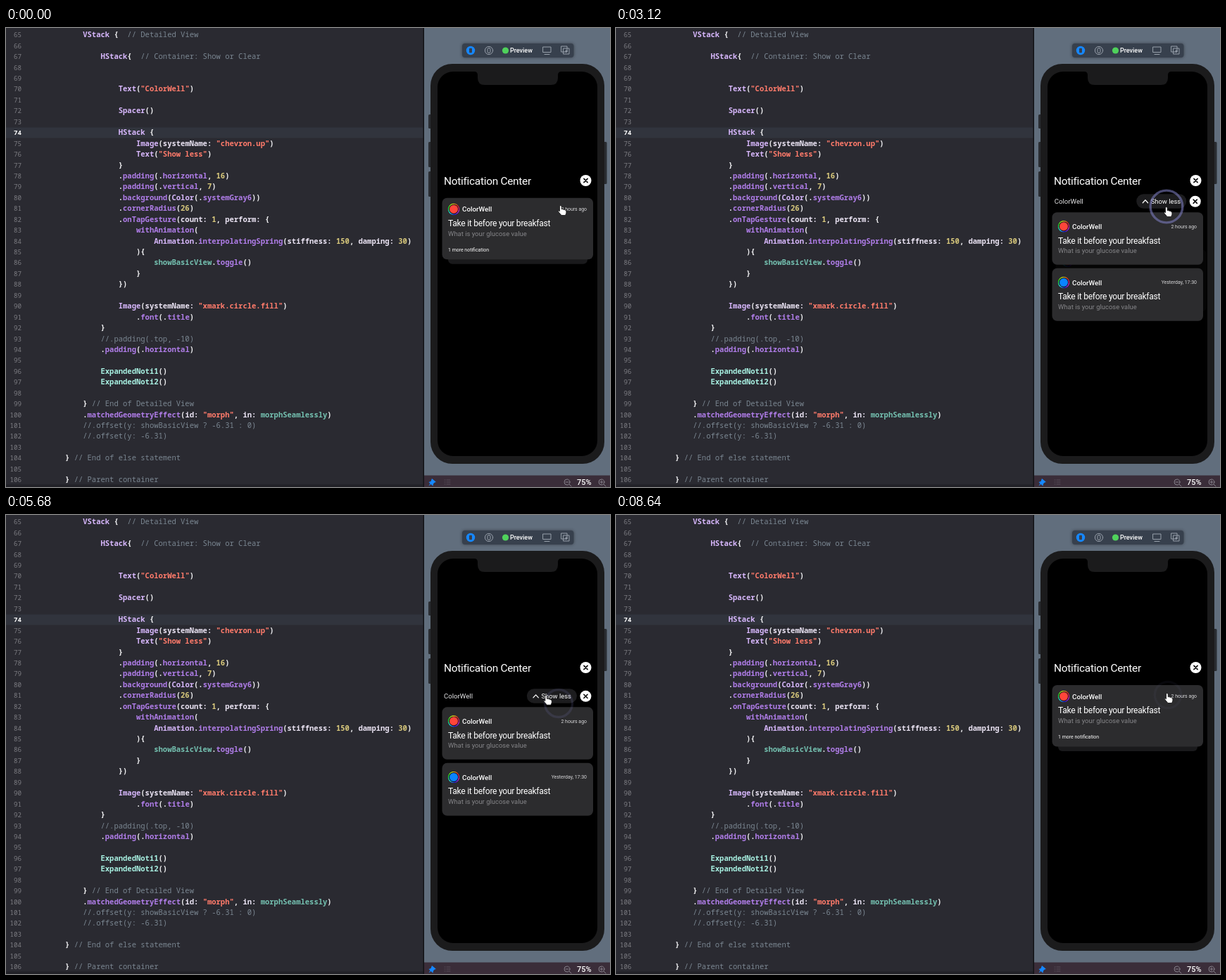
Animation of 858 by 653 pixels, one loop 8.72 s. Source, as an HTML page:

```html
<!DOCTYPE html>
<html lang="en">
<head>
<meta charset="utf-8">
<title>Notification morph</title>
<style>
  html, body { margin: 0; width: 100%; height: 100%; overflow: hidden; background: #2a2a31; }
  pre, svg { position: absolute; margin: 0; }
  svg { left: 0; top: 0; width: 858px; height: 653px; font-family: Roboto, Inter, sans-serif; fill: #fff; }
  pre { top: 2.3px; font: 600 10.52px/15.44px "Noto Sans Mono", "Liberation Mono", monospace; color: #f2f2f4; }
  #code { left: 84px; }
  #nums { left: 0; width: 22px; text-align: right; font-size: 9.2px; font-weight: 400; color: #7c7c82; }
  #nums b { color: #fff; }
  .comment { color: #7a8691; font-weight: 500; }
  .string { color: #ff7b6b; }
  .number { color: #d9c97c; }
  .type { color: #d8b8fd; }
  .label { color: #ebe4f4; }
  .own { color: #a8f1e2; }
  .state { color: #74c0b0; }
  .call { color: #b07de9; }
  .head { font-size: 12.1px; letter-spacing: -.28px; }
  .name { font-size: 9.8px; font-weight: 500; }
  .sub { font-size: 9.45px; fill: #858588; }
  .tiny { font-size: 6.95px; }
  .line { fill: none; stroke-linecap: round; stroke-linejoin: round; }
  #bar { filter: drop-shadow(0 0 2px #0006); }
</style>
</head>
<body>
<svg id="stage" viewBox="0 0 858 653"></svg>
<pre id="nums"></pre>
<pre id="code">
    VStack {  // Detailed View

        HStack{  // Container: Show or Clear


            Text("ColorWell")

            Spacer()

            HStack {
                Image(systemName: "chevron.up")
                Text("Show less")
            }
            .padding(.horizontal, 16)
            .padding(.vertical, 7)
            .background(Color(.systemGray6))
            .cornerRadius(26)
            .onTapGesture(count: 1, perform: {
                withAnimation(
                    Animation.interpolatingSpring(stiffness: 150, damping: 30)
                ){
                    showBasicView.toggle()
                }
            })

            Image(systemName: "xmark.circle.fill")
                .font(.title)
        }
        //.padding(.top, -10)
        .padding(.horizontal)

        ExpandedNoti1()
        ExpandedNoti2()

    } // End of Detailed View
    .matchedGeometryEffect(id: "morph", in: morphSeamlessly)
    //.offset(y: showBasicView ? -6.31 : 0)
    //.offset(y: -6.31)

} // End of else statement

} // Parent container</pre>
<script>
const $ = id => document.getElementById(id);

// Syntax colours
function kind(word) {
  if (word.startsWith('//')) return 'comment';
  if (word[0] === '"') return 'string';
  if (/^\d/.test(word)) return 'number';
  if (word.endsWith(':')) return 'label';
  if (/^Expanded/.test(word)) return 'own';
  if (/^(showBasicView|morphSeamlessly)$/.test(word)) return 'state';
  return /^[A-Z]/.test(word) ? 'type' : 'call';
}
$('code').innerHTML = $('code').textContent.replace(/\/\/.*|"[^"]*"|\w+:?/g,
  word => `<span class="${kind(word)}">${word}</span>`);
$('nums').innerHTML = Array.from({ length: 42 }, (_, i) => i + 65)
  .map(n => n === 74 ? `<b>${n}</b>` : n).join('\n');

// Drawing helpers
const box = (x, y, w, h, r, fill, more = '') =>
  `<rect x="${x}" y="${y}" width="${w}" height="${h}" rx="${r}" fill="${fill}" ${more}/>`;
const dot = (x, y, r, fill) => `<circle cx="${x}" cy="${y}" r="${r}" fill="${fill}"/>`;
const text = (x, y, s, cls, more = '') => `<text x="${x}" y="${y}" class="${cls}" ${more}>${s}</text>`;
const line = (d, stroke, width = 1) =>
  `<path class="line" d="${d}" stroke="${stroke}" stroke-width="${width}"/>`;

const closeButton = (x, y) => dot(x, y, 8, '#fff') +
  line(`M${x - 2.6} ${y - 2.6}l5.2 5.2m0 -5.2l-5.2 5.2`, '#000', 1.5);

function well(x, y, fill) {
  const at = a => `${x + 7.5 * Math.cos(a)} ${y + 7.5 * Math.sin(a)}`;
  let ring = '';
  for (let i = 0; i < 24; i++) {
    const a = i * Math.PI / 12;
    ring += line(`M${at(a)}A7.5 7.5 0 0 1 ${at(a + .27)}`, `hsl(${315 - i * 15} 75% 50%)`, 1.1);
  }
  return dot(x, y, 7.5, '#151517') + ring + dot(x, y, 6, fill);
}

// mid is the height of the card's title row
function card(y, height, mid, color, when) {
  return box(619.5, y, 214.5, height, 7, '#2c2c2e') +
    well(636, mid, color) +
    text(648, mid + 3.6, 'ColorWell', 'name') +
    text(825, mid + 2.3, when, 'tiny', 'text-anchor="end" fill="#d8d8da"') +
    text(628, mid + 24.4, 'Take it before your breakfast', 'head') +
    text(628, mid + 37.7, 'What is your glucose value', 'sub');
}

const lens = (x, plus) =>
  line(`M${x + 3} 649l3 3M${x - 2} 646h4${plus ? `M${x} 644v4` : ''}`, '#85808a') +
  `<circle class="line" cx="${x}" cy="646" r="4" stroke="#85808a"/>`;

$('stage').innerHTML =
  box(0, 141.5, 593, 15, 0, '#31343d') +
  box(0, 649.5, 593, 4, 0, '#212127') +
  box(594, 0, 264, 653, 0, '#616e7d') +
  box(592.5, 0, 1.5, 653, 0, '#121216') +
  box(594, 636.5, 264, 17, 0, '#3a2d39') +
  // Preview toolbar
  box(648, 22, 158.5, 20, 4, '#37404d', 'id="bar"') +
  dot(660, 32, 6.2, '#1687ff') + box(658, 28.8, 4, 6.4, 1, '#37404d') +
  '<g class="line" stroke="#98a0ab"><circle cx="686" cy="32" r="5.6"/><rect x="684" y="28.5" width="4" height="7" rx="2"/>' +
  '<path d="M763 27h11v7.5h-11zM765 37.5h7M789 26h8v8h-8zM792 29h8v8h-8zM794.5 33h3M796 31.5v3"/></g>' +
  dot(709.5, 32, 4.6, '#4fd15b') +
  text(716, 35.4, 'Preview', '', 'font-size="9" font-weight="500"') +
  // Zoom bar
  '<path d="M605 641l6 5l-2 .5l-2 2l-.5 3l-3 -2.5l-3 2.5l2 -3.5l-2 -2l3 -1z" fill="#1687ff"/>' +
  line('M623 643h1m2 0h5M623 646h1m2 0h5M623 649h1m2 0h5', '#554a57') +
  lens(797, false) + lens(846, true) +
  text(811, 650.3, '75%', '', 'font-size="11" font-weight="500"') +
  // Phone
  [[600, 123, 20], [600, 162, 36], [600, 204, 36], [848, 162, 60]]
    .map(([x, y, h]) => box(x, y, 5.5, h, 1.5, '#292c31')).join('') +
  box(603, 51, 247, 569, 31, '#1b1b1c') +
  box(613, 62, 227, 547, 22, '#000') +
  '<path d="M665 62h124q-5 0 -5 5v4q0 10 -10 10h-94q-10 0 -10 -10v-4q0 -5 -5 -5z" fill="#1b1b1c"/>' +
  '<g id="views">' +
    '<g>' + text(622, 222.8, 'Notification Center', '', 'font-size="15.4" letter-spacing="-.27"') +
      closeButton(823.5, 217) + '</g>' +
    '<g id="detail">' +
      `<g id="left">${text(622, 262.2, 'ColorWell', '', 'font-size="9.6" fill="#e4e4e6"')}</g>` +
      `<g id="right">${box(740, 248.5, 71, 20.5, 10.2, '#1c1c1e') +
        line('M749 261l3.7 -4l3.7 4', '#fff', 1.2) +
        text(760.5, 262.4, 'Show less', '', 'font-size="9.4"') + closeButton(823.5, 259)}</g>` +
      card(274.5, 74.5, 294.5, '#ff453a', '2 hours ago') +
      card(354, 75, 374.2, '#0a84ff', 'Yesterday, 17:30') +
    '</g>' +
    '<g id="basic">' + box(628, 310, 198, 25.5, 6, '#1a1a1c') +
      card(241.5, 87.5, 257.5, '#ff453a', '2 hours ago') +
      text(628, 317.2, '1 more notification', 'tiny') +
    '</g>' +
  '</g>' +
  '<circle id="ring" class="line" stroke="#7f7fc2" stroke-width="3.4"/>' +
  '<path id="hand" stroke="#111" stroke-width=".8" stroke-linejoin="round" ' +
    'd="M-1.5 1q0 -1.5 1.3 -1.5t1.4 1.5v3.8q2 -.6 2.7 .5q1.8 -.3 2.2 .8q1.8 0 1.8 1.8v2.3l-1.3 3.3h-5.6l-4 -4.7q-1 -1.5 .4 -1.9l1.1 .9z"/>';

// Taps alternate between expanding and collapsing.
const LOOP = 8720, STEP = 80;
const taps = [200, 1880, 2735, 3820, 4923, 6040, 6800, 7790];
const path = [
  [0, 788, 253], [200, 788, 254], [850, 788, 254], [1200, 798, 279], [1520, 797, 283],
  [1620, 797, 283], [1880, 781, 258], [2735, 782, 254], [3120, 782, 255], [3820, 782, 257],
  [4923, 785, 268], [5040, 785, 268], [6040, 760, 252], [6400, 765, 259], [6800, 770, 262],
  [7440, 772, 264], [7790, 784, 256], [8640, 783, 254], [8720, 788, 253]
];

function pointer(t) {
  const i = path.findIndex(k => k[0] > t);
  const [t0, x0, y0] = path[i - 1], [t1, x1, y1] = path[i];
  const u = (t - t0) / (t1 - t0), e = u * u * (3 - 2 * u);
  return [x0 + (x1 - x0) * e, y0 + (y1 - y0) * e];
}

// Distance left in a spring of stiffness 150, damping 30
function springLeft(s) {
  const root = Math.sqrt(75), slow = 15 - root, fast = 15 + root;
  return (fast * Math.exp(-slow * s) - slow * Math.exp(-fast * s)) / (fast - slow);
}

const move = (id, x, y) => $(id).setAttribute('transform', `translate(${x} ${y})`);

function draw(t) {
  const index = (taps.filter(tap => tap <= t).length + 7) % 8;
  const age = (t - taps[index] + LOOP) % LOOP / 1000;
  const left = springLeft(age), opening = index % 2 === 0;
  const open = opening ? 1 - left : left;
  const inset = 6.3 * (1 - open);

  move('detail', 0, -103 * (1 - open));
  move('left', inset, 0);
  move('right', -inset, 0);
  move('basic', 6 * open, 84 * open);

  // The arriving view is solid and in front; the leaving one fades behind the title.
  const arriving = $(opening ? 'detail' : 'basic'), leaving = $(opening ? 'basic' : 'detail');
  arriving.setAttribute('opacity', 1);
  leaving.setAttribute('opacity', left < .01 ? 0 : left);
  if ($('views').lastChild !== arriving || $('views').firstChild !== leaving) {
    $('views').append(arriving);
    $('views').prepend(leaving);
  }

  move('ring', ...pointer(taps[index]));
  $('ring').setAttribute('r', Math.max(0, 26.3 - 9 * age));
  $('ring').setAttribute('opacity', Math.max(0, 1 - age / .9));
  move('hand', ...pointer(t));
}

function tick() {
  draw(Math.floor(performance.now() % LOOP / STEP) * STEP);
  requestAnimationFrame(tick);
}
tick();
</script>
</body>
</html>
```
